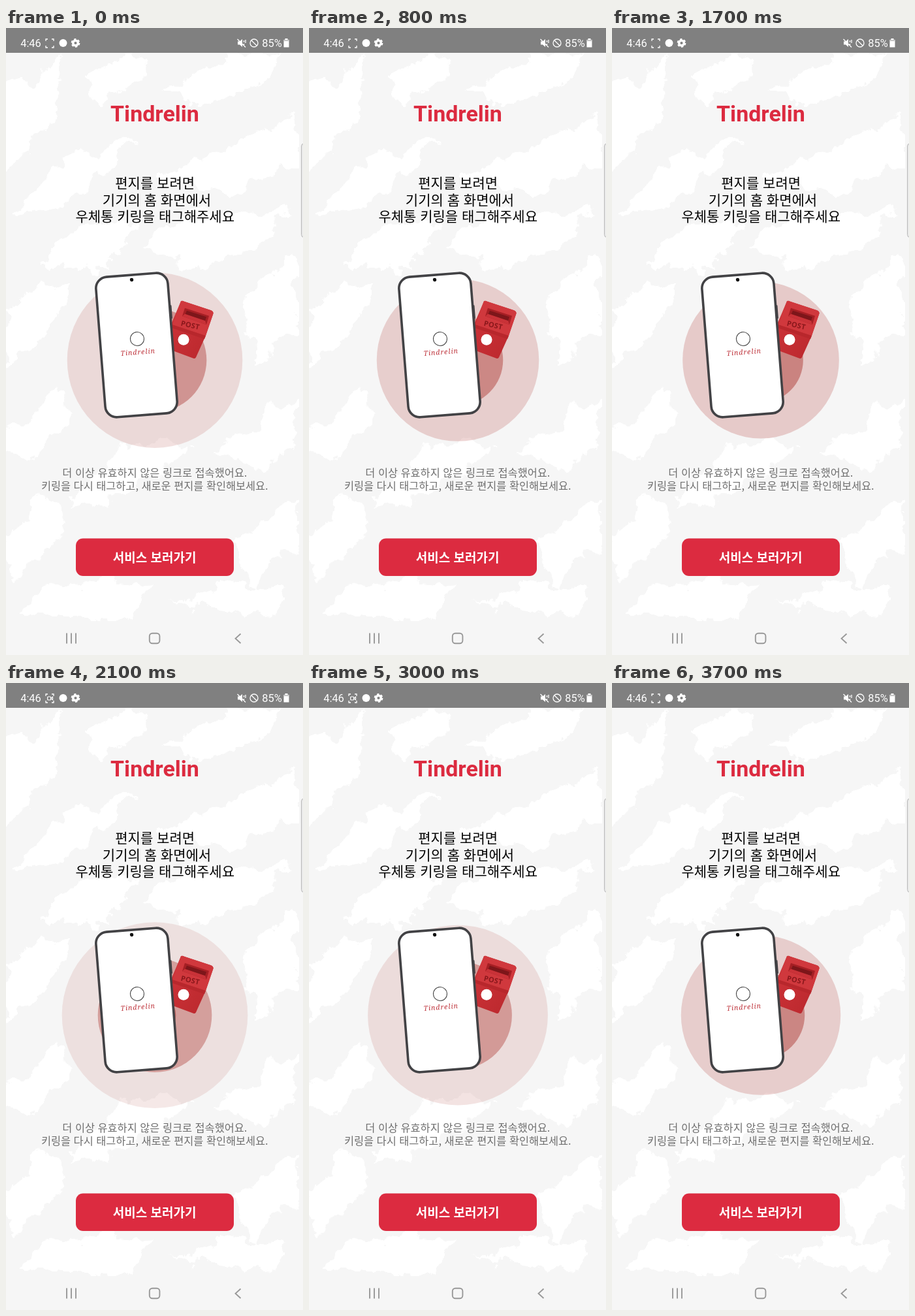
Animation of 455x960 px, one loop 3.8 s. Source, as an HTML page:

```html
<!DOCTYPE html>
<html lang="ko">
<head>
<meta charset="utf-8">
<title>Tindrelin</title>
<style>
  html, body { margin: 0; width: 100%; height: 100%; overflow: hidden; background: #f6f6f6; }
  svg { display: block; width: 100%; height: 100%; }
  text { text-anchor: middle; font-family: "Noto Sans CJK KR", "Noto Sans CJK", sans-serif; }
  .roboto { font-family: Roboto, sans-serif; }
  .head { font-size: 21px; fill: #000; }
  .note { font-size: 16.35px; fill: #6f6f6f; }
  .line { fill: none; stroke: #fff; stroke-width: 1.3; }
  .nav { fill: none; stroke: #999; stroke-width: 1.9; }
</style>
</head>
<body>
<svg viewBox="0 0 455 960">
  <defs>
    <filter id="rough" x="0" y="0" width="455" height="960" filterUnits="userSpaceOnUse" color-interpolation-filters="sRGB">
      <feTurbulence type="fractalNoise" baseFrequency=".03" numOctaves="5" seed="7"/>
      <feDisplacementMap in="SourceGraphic" scale="44" xChannelSelector="R" yChannelSelector="G"/>
      <feOffset dx="-6" dy="-6"/>
    </filter>
    <linearGradient id="front" x1="0" y1="0" x2="1" y2="1">
      <stop offset="0" stop-color="#cf343a"/>
      <stop offset="1" stop-color="#b9272c"/>
    </linearGradient>
    <clipPath id="page"><path d="M0 38H455V908H0Z"/></clipPath>
  </defs>

  <rect width="455" height="960" fill="#f6f6f6"/>
  <g clip-path="url(#page)"><g fill="#fff" filter="url(#rough)">
    <path d="M0 80L40 90L95 45L75 150L0 235Z"/>
    <path d="M125 85L200 38L225 75L150 115Z"/>
    <path d="M250 100L345 55L420 40L400 95L300 125Z"/>
    <path d="M20 290L100 205L210 180L95 275Z"/>
    <path d="M230 240L400 160L455 130V210L370 260Z"/>
    <path d="M60 370L100 318L210 300L160 370Z"/>
    <path d="M215 330L300 290L440 285L390 345L280 375Z"/>
    <path d="M0 440L60 400L110 395L70 470L0 530Z"/>
    <path d="M370 400L455 350V470L385 520Z"/>
    <path d="M0 640L85 555L110 600L40 670Z"/>
    <path d="M330 650L455 560V640L400 690Z"/>
    <path d="M100 740L190 640L290 650L180 730Z"/>
    <path d="M0 800L70 720L95 775L20 850Z"/>
    <path d="M350 800L455 715V790L380 860Z"/>
    <path d="M20 908L60 860L230 850L200 908Z"/>
    <path d="M265 890L340 855L440 870L420 908Z"/>
  </g></g>

  <rect width="455" height="38" fill="#808080"/>
  <g fill="#fff" font-size="16.4">
    <text class="roboto" x="38" y="29">4:46</text>
    <text class="roboto" x="407.5" y="29">85%</text>
  </g>
  <path class="line" d="M61 20V17H64M70 17H73V20M73 27V30H70M64 30H61V27"/>
  <g id="cam" fill="none" stroke="#fff" stroke-width="1.2">
    <rect x="63.6" y="21" width="5" height="5" rx="1"/>
    <path d="M69 23L71.5 21.3V25.7L69 24"/>
  </g>
  <circle cx="87.5" cy="23" r="6" fill="#fff"/>
  <g stroke="#fff" fill="none">
    <circle cx="106.5" cy="23" r="3.8" stroke-width="3.4"/>
    <circle cx="106.5" cy="23" r="5.8" stroke-width="2.2" stroke-dasharray="3.2 2.874"/>
  </g>
  <path d="M355 20.5H358L362 17V29L358 25.5H355Z" fill="#fff"/>
  <path class="line" d="M354.5 17L367 29.5M364.5 19V22M367 18V23M364.5 24V26"/>
  <circle class="line" cx="380" cy="23" r="6"/>
  <path class="line" d="M376 19L384 27"/>
  <path d="M427.5 16H431.5V18H433.5V29.5H425.5V18H427.5Z" fill="#fff"/>
  <path d="M426 18.5H433V20H426Z" fill="#b5b5b5"/>

  <rect x="452.5" y="177" width="12" height="143.5" rx="4" fill="#e9e9e9" stroke="#b8b8b8"/>

  <text class="roboto" x="228" y="143" font-size="34" font-weight="700" fill="#dc2b40">Tindrelin</text>
  <text class="head" x="228.2" y="245">편지를 보려면</text>
  <text class="head" x="231" y="270.5">기기의 홈 화면에서</text>
  <text class="head" x="228.2" y="296">우체통 키링을 태그해주세요</text>

  <g id="waves" fill="#b85652"></g>

  <g transform="translate(-1 1.2)">
    <path d="M269 417Q271 416 274 417.5L315 431Q319 432.5 318.5 436L306 472L292 503Q291 505.5 288 504.5L257 493Q254 491.5 254.5 488L255 450Z" fill="url(#front)"/>
    <path d="M269 417Q271 416 274 417.5L315 431Q319 432.5 318.5 436L307 470L256 453Z" fill="#d0383d"/>
    <path d="M256 453L307 470L305 475L255 458Z" fill="#b8272c"/>
    <path d="M275 427.5L312 439.5L308 453L271 440Z" fill="#a51f24"/>
    <path d="M278 431.5L308 441L306 447L275.5 437Z" fill="#7d161a"/>
    <path d="M271 440L275 436.5L306 447L308 453Z" fill="#c93238"/>
    <text transform="translate(282.5 457.5) rotate(13)" font-size="11" font-weight="700" letter-spacing=".3" fill="#8b181c" style="font-family:'Noto Sans',sans-serif">POST</text>
    <circle cx="273" cy="476" r="8.5" fill="#fff"/>
  </g>

  <g transform="translate(200 485.5) rotate(-4.5)">
    <rect x="55" y="-57" width="3" height="21" rx="1.2" fill="#3d3d40"/>
    <rect x="-55.2" y="-107.7" width="110.4" height="215.4" rx="17.5" fill="#fff" stroke="#424245" stroke-width="3.6"/>
    <circle cx=".4" cy="-100.3" r="2.7" fill="#111"/>
    <circle cx="1.7" cy="-9.4" r="10.5" fill="#fff" stroke="#444"/>
    <text x="1.3" y="14.5" font-size="10.5" font-style="italic" letter-spacing="1" fill="#bd3038" style="font-family:'Noto Serif',serif">Tindrelin</text>
  </g>

  <text class="note" x="227.8" y="686.5">더 이상 유효하지 않은 링크로 접속했어요.</text>
  <text class="note" x="227.8" y="706.5">키링을 다시 태그하고, 새로운 편지를 확인해보세요.</text>

  <rect x="107" y="781.5" width="242" height="57.5" rx="11" fill="#dc2b40"/>
  <text x="227.7" y="817.5" font-size="19" font-weight="700" fill="#fff">서비스 보러가기</text>

  <path class="nav" d="M93 926.5V942.5M100 926.5V942.5M107 926.5V942.5M359.5 927.5L351.5 934.7L359.5 942"/>
  <rect class="nav" x="219.8" y="926.7" width="15.6" height="15.6" rx="4.5"/>
</svg>
<script>
  const LOOP = 3800, STEP = 100;
  const GAP = 55, REACH = 3 * GAP, SPEED = 0.0562, PHASE = 79.3;
  const BLINK = { start: 70, period: 970, on: 450 };

  const cam = document.getElementById('cam');
  const group = document.getElementById('waves');
  const waves = [2, 1, 0].map(order => {
    const el = document.createElementNS('http://www.w3.org/2000/svg', 'circle');
    el.setAttribute('cx', 228);
    el.setAttribute('cy', 508.6);
    group.append(el);
    return { el, order };
  });

  function draw(t) {
    const base = (PHASE + t * SPEED) % GAP;
    for (const { el, order } of waves) {
      const r = base + order * GAP;
      el.setAttribute('r', r);
      el.setAttribute('fill-opacity', 1 - r / REACH);
    }
    const lit = t >= BLINK.start && (t - BLINK.start) % BLINK.period < BLINK.on;
    cam.style.visibility = lit ? 'visible' : 'hidden';
  }

  const origin = performance.now();
  function tick() {
    const t = (performance.now() - origin) % LOOP;
    draw(Math.floor(t / STEP) * STEP);
    requestAnimationFrame(tick);
  }
  tick();
</script>
</body>
</html>
```
